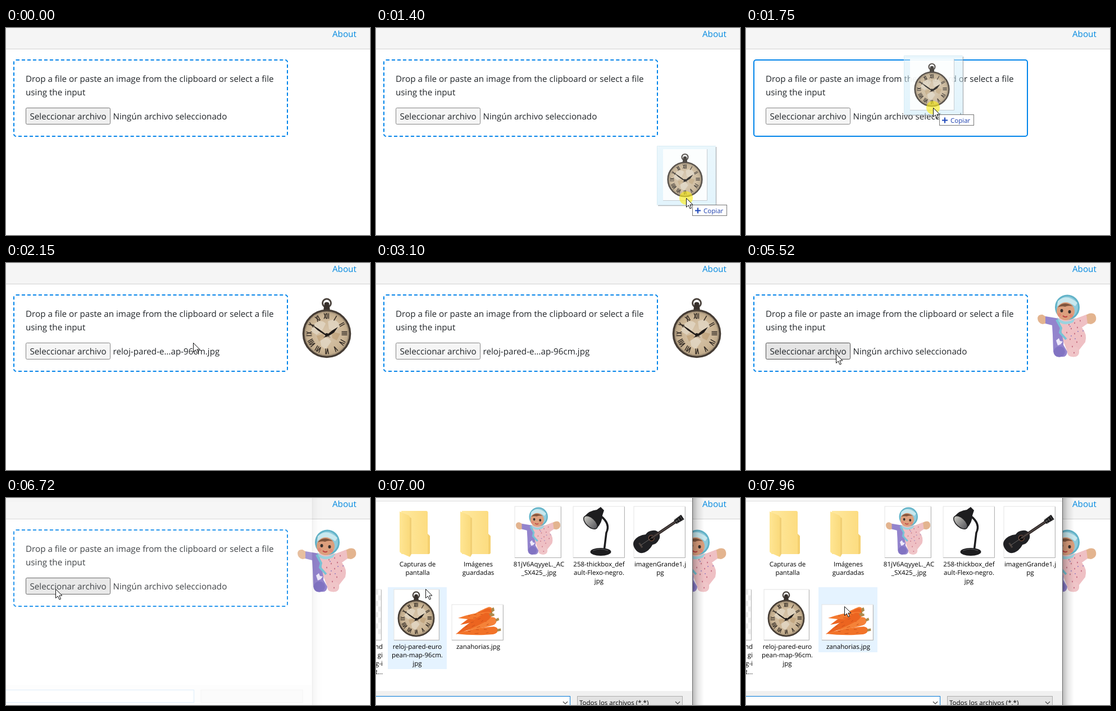
An HTML page that plays this animation: 648 px wide and 369 px high, repeating every 8000 ms.

```html
<!DOCTYPE html>
<html lang="es">
<head>
<meta charset="utf-8">
<title>Drop a file</title>
<style>
html, body { margin: 0; width: 100%; height: 100%; overflow: hidden; background: #fff; }
.stage { position: relative; width: 648px; height: 369px; overflow: hidden; }
.head { position: absolute; inset: 0 0 auto; height: 37px; background: #f5f5f5; border-bottom: 1px solid #d2d2d2; }
.drop { position: absolute; left: 13px; top: 56px; width: 489px; height: 138px; box-sizing: border-box;
  border: 2px dashed #0084ea; border-radius: 5px; }
svg { position: absolute; left: 0; top: 0; }
text { font-family: "Open Sans", "Noto Sans", sans-serif; text-rendering: geometricPrecision; white-space: pre; }
.page text { font-size: 15.2px; fill: #212529; }
.page .link { fill: #0088e0; }
.small text, .tip text { font-size: 11.5px; fill: #000; }
.mid text { text-anchor: middle; }

/* 8 s timeline, 70 ms = 0.875% */
.drop, .button, .pointer, .hover, .dialog, .icons, .ghost, .thumb, .press, .tip, .named, .empty, .clock, .doll
  { animation: 8s step-end infinite; }
.ghost, .thumb, .press, .tip, .named, .clock, .doll, .dialog, .icons { visibility: hidden; }
.drop { animation-name: drop; }
.button { animation-name: button; }
.pointer { animation-name: pointer; }
.hover { animation-name: hover; }
.dialog { animation-name: dialog; }
.icons { animation-name: icons; }
.ghost { animation-name: ghost; }
.thumb { animation-name: thumb; }
.press { animation-name: press; }
.tip { animation-name: tip; }
.named { animation-name: named; }
.empty { animation-name: empty; }
.clock { animation-name: clock; }
.doll { animation-name: doll; }

@keyframes drop {
  0%, 26.125%, 61.375% { border-style: dashed; }
  20.125%, 54.5% { border-style: solid; }
}
@keyframes button {
  0% { fill: #efefef; stroke: #767676; }
  16.625%, 78.125% { fill: #f5f5f5; stroke: #858585; }
  69%, 79.875% { fill: #e5e5e5; stroke: #4f4f4f; }
}
@keyframes pointer {
  0%, 38.75% { transform: translate(-200px, -200px); }
  16.625% { transform: translate(570px, 312px); }
  17.5% { transform: translate(552px, 303px); }
  18.375% { transform: translate(500px, 268px); }
  19.25% { transform: translate(487px, 204px); }
  20.125% { transform: translate(430px, 182px); }
  21% { transform: translate(376px, 158px); }
  21.875% { transform: translate(333px, 142px); }
  22.75% { transform: translate(331px, 140px); }
  23.625% { transform: translate(332px, 141px); }
  24.5% { transform: translate(333px, 142px); }
  35.25% { transform: translate(345px, 165px); }
  36.125% { transform: translate(370px, 215px); }
  37% { transform: translate(398px, 275px); }
  37.875% { transform: translate(420px, 340px); }
  54.5% { transform: translate(420px, 184px); }
  55.375% { transform: translate(362px, 180px); }
  56.125% { transform: translate(315px, 173px); }
  57% { transform: translate(284px, 165px); }
  57.875% { transform: translate(283px, 155px); }
  58.75% { transform: translate(288px, 146px); }
  59.625% { transform: translate(291px, 143px); }
  60.5% { transform: translate(292px, 142px); }
  66.375% { transform: translate(286px, 147px); }
  67.25% { transform: translate(260px, 154px); }
  68.125% { transform: translate(215px, 159px); }
  69% { transform: translate(160px, 162px); }
  69.875% { transform: translate(112px, 163px); }
  71.5% { transform: translate(88px, 162px); }
  89.125% { transform: translate(104px, 152px); }
  90% { transform: translate(150px, 132px); }
  90.875% { transform: translate(205px, 112px); }
  91.75% { transform: translate(252px, 98px); }
  92.625% { transform: translate(274px, 93px); }
  93.5% { transform: translate(274px, 101px); }
  94.375% { transform: translate(260px, 122px); }
  95.25% { transform: translate(232px, 152px); }
  96.125% { transform: translate(203px, 174px); }
  97% { transform: translate(180px, 187px); }
  98.625% { transform: translate(165px, 193px); }
  99.5%, 100% { transform: translate(175px, 193px); }
}
@keyframes hover {
  0% { x: 21px; y: 159px; height: 146px; }
  89.125%, 95.25% { x: 21px; y: 159px; height: 0; }
  90% { x: 129px; y: 12px; height: 132px; }
  91.75% { x: 237px; y: 12px; height: 132px; }
  96.125%, 100% { x: 129px; y: 159px; height: 116px; }
}
@keyframes dialog {
  0% { visibility: hidden; opacity: 0; transform: scale(.96); }
  83.125% { visibility: visible; opacity: .06; transform: scale(.962); }
  84% { visibility: visible; opacity: .15; transform: scale(.968); }
  84.875% { visibility: visible; opacity: .42; transform: scale(.981); }
  85.75% { visibility: visible; opacity: .72; transform: scale(.991); }
  86.625% { visibility: visible; opacity: .93; transform: scale(.998); }
  87.5%, 100% { visibility: visible; opacity: 1; transform: none; }
}
@keyframes icons { 0% { visibility: hidden; } 85.75%, 100% { visibility: visible; } }
@keyframes ghost {
  0%, 26.125%, 61.375% { visibility: hidden; }
  16.625%, 54.5% { visibility: visible; }
}
@keyframes thumb { 0%, 26.125% { visibility: hidden; } 16.625% { visibility: visible; } }
@keyframes press {
  0%, 26.125%, 61.375%, 79.875% { visibility: hidden; }
  16.625%, 54.5%, 78.125% { visibility: visible; }
}
@keyframes tip { 0%, 35.25% { visibility: hidden; } 32.75% { visibility: visible; } }
@keyframes named { 0%, 62.25% { visibility: hidden; } 26.125% { visibility: visible; } }
@keyframes empty { 0%, 62.25% { visibility: visible; } 26.125% { visibility: hidden; } }
@keyframes clock { 0%, 62.25% { visibility: hidden; } 26.875% { visibility: visible; } }
@keyframes doll { 0% { visibility: hidden; } 62.25%, 100% { visibility: visible; } }
</style>
</head>
<body>
<div class="stage">
<div class="head"></div>
<div class="drop"></div>
<svg width="648" height="369" viewBox="0 0 648 369">
<defs>
  <linearGradient id="shade"><stop stop-opacity=".28"/><stop offset=".5" stop-opacity=".09"/><stop offset="1" stop-opacity="0"/></linearGradient>
  <linearGradient id="glass" x2="0" y2="1"><stop stop-color="#d8f0fb"/><stop offset="1" stop-color="#c8eafa"/></linearGradient>
  <radialGradient id="dial"><stop stop-color="#d8c6ac"/><stop offset=".7" stop-color="#cdb797"/><stop offset="1" stop-color="#b8a384"/></radialGradient>
  <linearGradient id="fold"><stop stop-color="#ffe694"/><stop offset="1" stop-color="#fada7c"/></linearGradient>
  <linearGradient id="cover"><stop stop-color="#ffe99f"/><stop offset="1" stop-color="#fcdb7e"/></linearGradient>
  <linearGradient id="bulb"><stop stop-color="#c9c8c2"/><stop offset="1" stop-color="#55555a"/></linearGradient>

  <g id="watch">
    <circle cy="-54.5" r="7.500" fill="none" stroke="#4a433d" stroke-width="3"/>
    <path d="M-4-55Q0-58 4-55L6-41H-6Z" fill="#37302b"/>
    <circle r="41.5" fill="url(#dial)" stroke="#463d35" stroke-width="3.6"/>
    <circle r="38.500" fill="none" stroke="#94836c"/>
    <path d="M-24-16Q-10-28-2-18L-8-6-18 2-28-4ZM2-22Q16-30 24-14L14-4 4-8ZM-12 8Q2 4 8 14L-2 28-10 22Z" fill="#e6dccb" opacity=".7"/>
    <path d="M-18 4L-6 0-4 8-14 14ZM8-4L24 0 18 12 10 8Z" fill="#bd9c70" opacity=".6"/>
    <g id="numerals" fill="none" stroke="#332b25" stroke-width="1.5"></g>
    <path d="M7 7L-15-9-28-17-16-6-1 4ZM-6 7L10-6 20-12 13-2 2 5Z" fill="#211c19"/>
    <circle cy="2" r="3" fill="#211c19"/>
  </g>

  <g id="toy">
    <path d="M536 97L528 92Q520 91 519 98 519 107 528 109L538 107ZM602 94L611 90Q621 88 623 96 625 106 614 109L602 107Z" fill="#e3b48f"/>
    <path d="M533 95L557 99 566 120 565 146 572 158Q571 169 561 167 549 170 547 158L546 128 545 111 533 108Z" fill="#9384cd"/>
    <path d="M557 98L587 99 606 92 608 108 598 115Q608 127 604 141L593 155Q594 168 583 167 572 168 572 158L565 140Z" fill="#efc0c4"/>
    <ellipse cx="558" cy="158" rx="10" ry="9.500" fill="#8173c2"/>
    <ellipse cx="583" cy="158" rx="10" ry="9.500" fill="#f0c5c8"/>
    <path d="M553 101L561 116 559 124 570 136" fill="none" stroke="#79c3d6" stroke-width="4"/>
    <path d="M552 138l5-4 2 5 5 1-4 5-5 2z" fill="#eee9fa"/>
    <path d="M574 110h2M584 107h2M594 103h2M578 117h2M589 115h2M570 124h2M584 126h2M596 130h2M576 136h2M588 141h2M580 149h2M583 160h2" stroke="#c97688" stroke-width="2.500"/>
    <path d="M576 113h2M590 122h2M578 130h2M585 135h2M599 121h2" stroke="#a78abf" stroke-width="2"/>
    <path d="M554 97Q568 111 587 98L582 106Q568 113 557 105Z" fill="#9cd3df"/>
    <ellipse cx="572" cy="79" rx="20.500" ry="21" fill="#8fcbdc" stroke="#62b3c8" stroke-width="3"/>
    <path d="M555 68Q570 53 590 71L586 77Q570 64 554 77Z" fill="#c9e8ee"/>
    <ellipse cx="569" cy="86" rx="16" ry="16" fill="#dc9f7d"/>
    <path d="M555 79Q565 66 582 77 573 75 568 78 562 76 555 79Z" fill="#80553d"/>
    <ellipse cx="562" cy="85" rx="2.500" ry="3" fill="#39302e"/>
    <ellipse cx="576" cy="87" rx="2.500" ry="3" fill="#39302e"/>
    <circle cx="558" cy="92" r="3" fill="#e28a76"/><circle cx="579" cy="94" r="3" fill="#e28a76"/>
    <path d="M564 94Q568 98 572 95" fill="none" stroke="#bd4244" stroke-width="2"/>
  </g>

  <g id="folder">
    <path d="M3 0H47Q50 0 50 3V41L54 45V74Q54 77 51 77H3Z" fill="url(#cover)"/>
    <path d="M50 41L54 45V74Q54 77 50 77Z" fill="#f4d070"/>
    <path d="M0 1L16 8Q18 9 18 11V82L2 75Q0 74 0 72Z" fill="url(#fold)"/>
    <path d="M18 11V82L21 77V13Z" fill="#f1cf74"/>
  </g>

  <g id="carrot">
    <path d="M0 0Q30-9 61-8 68-6 67 1 66 7 59 8 30 8 0 0Z"/>
    <path d="M20-3l4 1M32-5l5 1M30 3h6M45-4l5 1M48 4l4-1" stroke="#c9501a" fill="none"/>
    <path d="M66-2L72-3V2L66 3Z" fill="#a98a4c"/>
  </g>
  <path id="chevron" d="M-4-2L0 2 4-2" fill="none" stroke="#444" stroke-width="1.1"/>
</defs>

<g class="page">
  <text class="link" x="581" y="16">About</text>
  <text x="35" y="96">Drop a file or paste an image from the clipboard or select a file</text>
  <text x="35" y="120">using the input</text>
  <rect class="button" x="35.5" y="142.5" width="150" height="29" rx="2"/>
  <text x="42.5" y="163">Seleccionar archivo</text>
  <text class="empty" x="190.5" y="163">Ningún archivo seleccionado</text>
  <text class="named" x="190.5" y="163">reloj-pared-e…ap-96cm.jpg</text>
  <use class="clock" href="#watch" x="571" y="126"/>
  <use class="doll" href="#toy"/>
</g>

<g class="tip">
  <rect x="341.5" y="156.5" width="211" height="24" fill="#fff" stroke="#8a8a8a"/>
  <text x="349" y="172.5">reloj-pared-european-map-96cm.jpg</text>
</g>

<g class="dialog small">
  <rect x="563" width="21" height="400" fill="url(#shade)"/>
  <rect width="563" height="400" fill="#fff"/>
  <rect width="563" height="5" fill="#fafafa"/>
  <path d="M0 5.5H563" stroke="#dcdcdc"/>
  <rect y="344" width="563" height="56" fill="#f0f0f0"/>
  <path d="M563.5 0V400" stroke="#666"/>
  <rect x="-5" y="353.5" width="350.5" height="23" fill="#fff" stroke="#0078d7"/>
  <rect x="358.5" y="353.5" width="187" height="23" fill="#e3e3e3" stroke="#adadad"/>

  <g class="icons">
    <use href="#chevron" x="337" y="365"/>
    <use href="#chevron" x="537" y="365"/>
    <text x="362" y="369">Todos los archivos (*.*)</text>
    <rect class="hover" x="21" y="159" width="105" height="146" fill="#e5f3ff"/>
    <use href="#folder" x="42" y="23"/>
    <use href="#folder" x="150" y="23"/>
    <g id="cards"></g>
    <path d="M0 168h4m0 10h5m-9 10h4m0 10h5m-9 10h4m0 10h5m-9 10h4m0 10h5" stroke="#ececec" stroke-width="9"/>
    <use href="#toy" transform="translate(-145.5 -26.5) scale(.76)"/>
    <use href="#watch" transform="translate(71.5 214.5) scale(.76)"/>

    <g fill="#1d1d1f">
      <path d="M400 32Q418 46 410 62L406 95" fill="none" stroke="#1d1d1f" stroke-width="3.500"/>
      <path d="M371 33Q380 22 393 21L400 16 406 22 403 31Q403 44 393 54Z"/>
      <ellipse cx="382" cy="43.500" rx="15" ry="8" transform="rotate(43 382 43.500)" fill="url(#bulb)" stroke="#1d1d1f" stroke-width="1.500"/>
      <ellipse cx="400" cy="96" rx="18.500" ry="7"/>
      <path d="M386 94Q400 88 413 94" fill="none" stroke="#5c5c5e"/>
    </g>

    <g transform="translate(482 77) rotate(-34)">
      <path d="M-25 0Q-25-16-7-15 0-14 5-11 12-14 19-10 26-7 26 0 26 7 19 10 12 14 5 11 0 14-7 15-25 16-25 0Z" fill="#202023"/>
      <circle cx="10" r="5" fill="#050505" stroke="#8a5a48"/>
      <path d="M10-2.500H62V2.500H10Z" fill="#332a29"/>
      <path d="M61-4L77-5V5L61 4Z" fill="#19191b"/>
      <path d="M-13-5V5" stroke="#4b423e" stroke-width="3"/>
      <path d="M-13 0H70M64-6v12M69-6v12M74-6v12" stroke="#8b8782" stroke-width=".6"/>
    </g>

    <g fill="#ec6420">
      <use href="#carrot" transform="translate(162 216) rotate(-22) scale(.72 .7)" fill="#f58238"/>
      <use href="#carrot" transform="translate(150 226) rotate(-24) scale(.92 .85)"/>
      <use href="#carrot" transform="translate(146 214) rotate(-5) scale(.9 .8)" fill="#f47a30"/>
      <use href="#carrot" transform="translate(150 237) rotate(-17) scale(1 .9)" fill="#f58238"/>
      <use href="#carrot" transform="translate(142 243) rotate(-30) scale(1.05 .85)"/>
      <use href="#carrot" transform="translate(142 242) rotate(-5) scale(1.12 .85)" fill="#f27328"/>
    </g>
    <g id="names" class="mid"></g>
    <g text-anchor="end">
      <text x="12" y="269">nd</text><text x="12" y="284">gi</text>
      <text x="12" y="299">g-i</text><text x="12" y="314">t...</text>
    </g>
  </g>
</g>

<g class="pointer small">
  <g class="ghost">
    <rect x="-51" y="-92" width="104" height="105" rx="2" fill="url(#glass)" opacity=".52"/>
    <path d="M-50 13.500H53.500V-91" fill="none" stroke="#8c9499" stroke-width="1.500" opacity=".65"/>
    <path d="M-51.500 13V-92.500H53" fill="none" stroke="#cfe6f1" opacity=".8"/>
  </g>
  <g class="thumb" opacity=".88">
    <rect x="-41" y="-87" width="78" height="91" fill="#fff"/>
    <path d="M-41 4.500H37.500V-87" fill="none" stroke="#c3c8cb"/>
    <use href="#watch" transform="translate(-2 -33) scale(.73)"/>
  </g>
  <circle class="press" r="12" fill="#fbec20" opacity=".65"/>
  <path d="M.5 .5V16.500L4.300 13 7 19 9.500 18 6.900 12H12Z" fill="#fff" stroke="#111"/>
  <g class="ghost">
    <rect x="11.500" y="12.500" width="61" height="19" fill="#fff" stroke="#777"/>
    <path d="M16 22.500H26M21 17.500V27.500" stroke="#1d46b8" stroke-width="2"/>
    <text x="31" y="26.500" style="fill:#1d3fae">Copiar</text>
  </g>
</g>
</svg>
</div>
<script>
const get = id => document.getElementById(id);
function add(parent, tag, attrs, text = "") {
  const el = document.createElementNS("http://www.w3.org/2000/svg", tag);
  for (const key in attrs) el.setAttribute(key, attrs[key]);
  el.textContent = text;
  get(parent).append(el);
}

// Narrow dial numerals: each stroke starts at the rim side of its slot
const strokes = { I: "v10", V: "l2 10 2-10", X: "l4 10m0-10l-4 10" };
const slot = { I: 2.8, V: 5.4, X: 5.4 };
"XII I II III IV V VI VII VIII IX X XI".split(" ").forEach((numeral, i) => {
  const letters = [...numeral];
  let x = -letters.reduce((sum, c) => sum + slot[c], -1.4) / 2, d = "";
  for (const c of letters) {
    d += `M${x} -36.5${strokes[c]}`;
    x += slot[c];
  }
  add("numerals", "path", { d, transform: `rotate(${i * 30})` });
});

const cards = [[247, 15, 82, 91], [351, 15, 91, 91], [459, 15, 91, 91], [32, 163, 80, 90], [135, 190, 91, 63], [-60, 163, 69, 90]];
for (const [x, y, width, height] of cards) {
  add("cards", "rect", { x, y, width, height, fill: "#fff", stroke: "#e4e4e4" });
  add("cards", "path", { d: `M${x} ${y + height + .5}h${width + .5}v${-height}`, fill: "none", stroke: "#b5b5b5" });
}

const names = [
  [74, 122, "Capturas de|pantalla"],
  [182, 122, "Imágenes|guardadas"],
  [290, 122, "81jV6AqyyeL._AC|_SX425_.jpg"],
  [397, 122, "258-thickbox_def|ault-Flexo-negro.|jpg"],
  [506, 122, "imagenGrande1.j|pg"],
  [73.5, 269, "reloj-pared-euro|pean-map-96cm.|jpg"],
  [182, 269, "zanahorias.jpg"]
];
for (const [x, y, label] of names)
  label.split("|").forEach((line, i) => add("names", "text", { x, y: y + i * 15 }, line));
</script>
</body>
</html>
```
